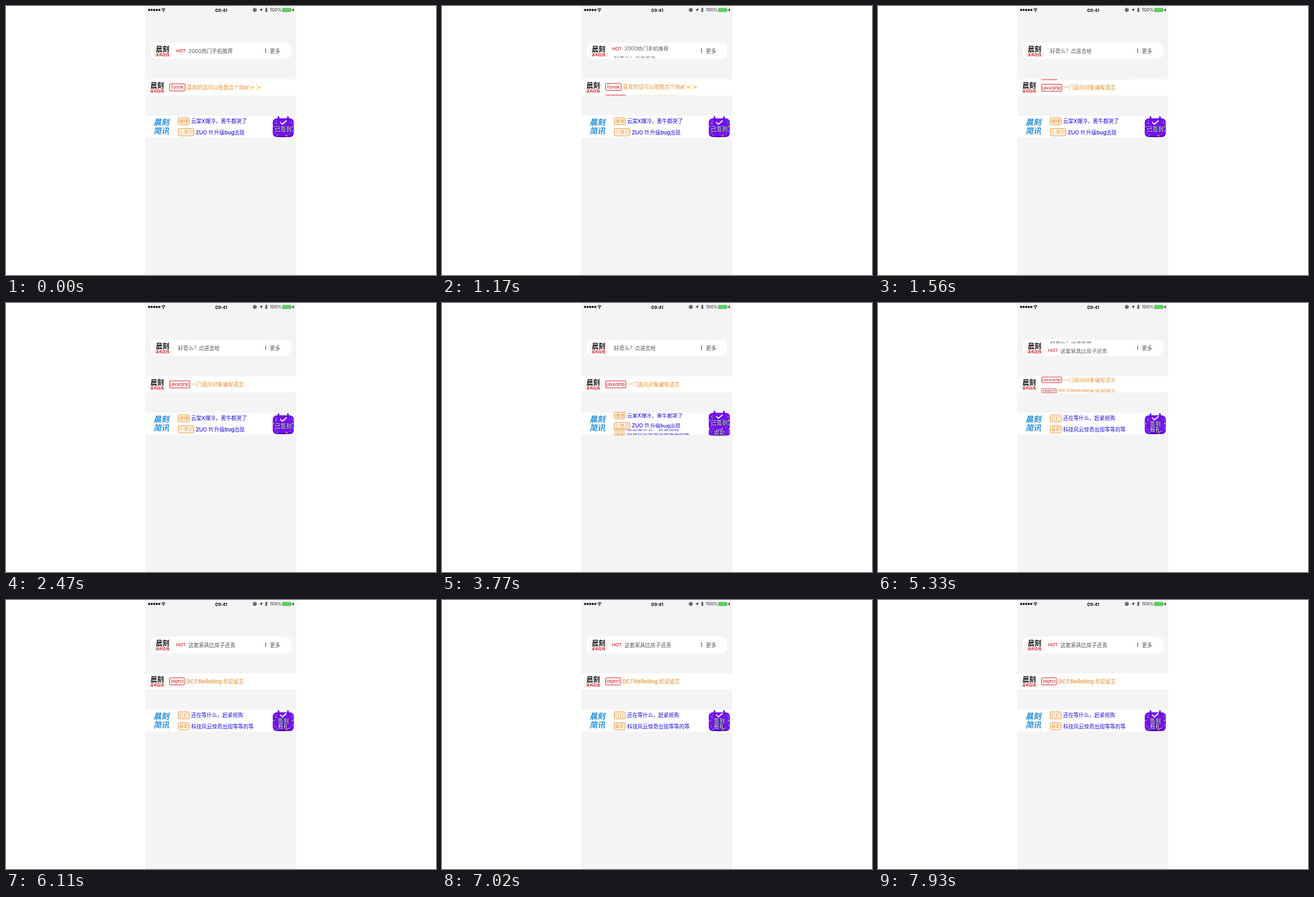
Write an HTML page that moves like this. It is 640x400 px and loops after 8000 ms.

```html
<!DOCTYPE html>
<html lang="zh-CN">
<head>
<meta charset="utf-8">
<style>
  html, body { margin: 0; width: 100%; height: 100%; overflow: hidden; background: #fff; }
  svg { display: block; width: 640px; height: 400px; }
  text { font: 7.75px Inter, "Noto Sans CJK SC", "Noto Sans CJK", sans-serif; white-space: pre; }
</style>
</head>
<body>
<svg id="stage" viewBox="0 0 640 400"></svg>
<script>
const LOOP = 8000, ROLL = 500;
const RED = '#d0262a', ORANGE = '#e58f28', BLUE = '#1c0cd2', GREY = '#555';

const text = (x, y, str, fill, size = 7.75, extra = '') =>
  `<text x="${x}" y="${y + size * 0.37}" fill="${fill}" style="font-size:${size}px;${extra}">${str}</text>`;
const middle = 'text-anchor:middle;';
const medium = 'font-weight:500;';
const bold = 'font-weight:700;';
const rect = (x, y, w, h, fill, r = 0) =>
  `<rect x="${x}" y="${y}" width="${w}" height="${h}" rx="${r}" fill="${fill}"/>`;
const line = (d, stroke, width = 1) =>
  `<path d="${d}" fill="none" stroke="${stroke}" stroke-width="${width}" stroke-linecap="round" stroke-linejoin="round"/>`;

const tag = (x, y, w, str, color, size) =>
  `<rect x="${x + .4}" y="${y - 5.2}" width="${w - .8}" height="10.4" rx="1.4" fill="none" stroke="${color}" stroke-width=".9"/>` +
  text(x + w / 2, y, str, color, size, middle + medium);

const sparkle = (x, y, r) => {
  const k = r * .2;
  return `<path d="M${x} ${y - r}L${x + k} ${y - k}L${x + r} ${y}L${x + k} ${y + k}L${x} ${y + r}L${x - k} ${y + k}L${x - r} ${y}L${x - k} ${y - k}Z" fill="#f3c64a"/>`;
};
const sparkles = x => sparkle(x + 5.6, .3, 3.8) + sparkle(x + 2, -2.6, 1.7) + sparkle(x + 2.2, 3, 1.7);

const badge = (x, y) =>
  `<rect x="${x + .3}" y="${y - 4.5}" width="25.4" height="12" fill="none" stroke="#ecdccb" stroke-width=".6"/>` +
  rect(x + 2.5, y - 7.5, 21, 15, '#fff') +
  text(x + 13, y - 2.4, '晨刻', '#111', 10, middle + 'font-weight:900;') +
  text(x + 13, y + 4.7, '禾屿在线', RED, 5.1, middle + bold);

const calendar = (lines, checkY) => {
  const confetti = [
    [399, -1, '#f0a23c'], [401, -6, '#29c3d8'], [403, -9, '#e336b4'], [425, -7, '#2b9df0'],
    [427, -1, '#e9d34a'], [400, 8, '#e336b4'], [404, 12, '#29c3d8'], [417, 12.5, '#f0a23c'],
    [423, 10, '#e336b4'], [426.5, 6, '#29c3d8']
  ];
  return rect(397, -12.5, 31.5, 28, '#7412f0', 6) +
    line('M400 13Q412 17 425.5 13', '#3d0b9c', 1.3) +
    confetti.map(([x, y, c], i) => line(`M${x} ${y}l${i % 2 ? 1.4 : -1} 1.5`, c, 1.3)).join('') +
    line('M405.6 -14.5v4M419.6 -14.5v4', '#5a12d0', 2.4) +
    line(`M408.4 ${checkY}l3 2.8l5.8 -5.2`, '#fff', 1.6) +
    lines.map(([str, y]) =>
      text(412.7, y, str, '#fff', 8.3, middle + medium + 'paint-order:stroke;stroke:#35107c;stroke-width:1px;')).join('');
};

const hot = str => text(253, 0, 'HOT', RED, 6.8, medium) + text(271.5, 0, str, GREY);
const tagged = (width, label, str, extra = '') =>
  tag(243, 0, width, label, RED, 6.6) + text(243 + width + 2.2, 0, str, ORANGE, 7.75, medium) + extra;
const news = (pairs, icon) => pairs.map(([label, str], i) => {
  const y = i * 16.3 - 8, w = label.length * 7 + 3;
  return tag(256, y, w, label, ORANGE, 7.1) + text(258.5 + w, y, str, BLUE, 7.75, medium);
}).join('') + icon;

// Each row is a cube turning upwards; radius sets how far its faces travel.
const rows = [
  { y: 66.8, radius: 9.5, starts: [1014, 5014], faces: [
    hot('2000热门手机推荐'),
    text(256, 0, '好奇么？点进去哈', GREY),
    hot('这套家具比房子还贵')
  ] },
  { y: 121, radius: 11.5, starts: [1115, 5115], faces: [
    tagged(24, 'fornik', '喜欢的话可以给我点个Star', sparkles(361) + sparkles(371.3)),
    tagged(31, 'java/php', '一门面向对象编程语言'),
    tagged(23.5, 'object', 'DCTitleRolling 欢迎留言')
  ] },
  { y: 179.5, radius: 13, starts: [3614], faces: [
    news([['爆爆', '云棠X爆冷，黄牛都哭了'], ['小常识', 'ZUO 11 升级bug出现']],
      calendar([['已签到', 3.5]], -6.5)),
    news([['红红', '还在等什么，赶紧抢购'], ['最新', '科技风云惊奇出现等等的等']],
      calendar([['签到', .7], ['有礼', 8.3]], -8.5))
  ] }
];

const statusBar =
  [0, 1, 2, 3, 4].map(i => `<circle cx="${213 + i * 3.8}" cy="5.8" r="1.6" fill="#000"/>`).join('') +
  line('M231.7 4.5Q234.3 2.3 236.9 4.5M232.8 6Q234.3 4.8 235.8 6', '#000', 1) +
  '<circle cx="234.3" cy="7.6" r=".9"/>' +
  text(320.3, 6, '09:41', '#000', 6.8, middle + 'font-weight:600;') +
  '<circle cx="370.3" cy="5.8" r="2.5" fill="none" stroke="#000" stroke-width=".8"/>' +
  rect(369.2, 5.4, 2.2, 1.7, '#000') +
  line('M369.7 5.4v-.6q.6 -.8 1.2 0v.6', '#000', .5) +
  '<path d="M382 3.4L377 5.9H379.5V8.4Z"/>' +
  line('M385.7 4.2l3.3 3.2l-1.7 1.5v-6.2l1.7 1.5l-3.3 3.2', '#000', .7) +
  text(393, 6, '100%', '#222', 6.4) +
  '<rect x="411.2" y="3.2" width="13" height="5.4" rx="1" fill="#58d35c" stroke="#4a9a4c" stroke-width=".5"/>' +
  rect(424.6, 4.8, .9, 2.2, '#4a9a4c') +
  '<path d="M428.2 3L426 6.3H427.3L426.8 8.8L429 5.4H427.7Z"/>';

const slanted = (y, str) =>
  `<g transform="translate(232 ${y}) skewX(-10)">` +
  text(0, 0, str, '#258cd6', 11.6, middle + bold) + '</g>';

const stage = document.getElementById('stage');
stage.innerHTML =
  rect(207, 0, 225, 400, '#f4f4f4') + statusBar +
  rect(215.5, 54.5, 208.5, 24, '#fff', 8) +
  rect(207, 109, 225, 24, '#fff') +
  rect(207, 163, 225, 32.7, '#fff') +
  badge(220, 67) + badge(212, 121) +
  slanted(173, '晨刻') + slanted(186, '简讯') +
  rect(386, 63, .9, 7, '#5b4a3c') + text(392.7, 66.8, '更多', GREY) +
  rows.map(row => row.faces.map(face => `<g class="face">${face}</g>`).join('')).join('');

const nodes = [...stage.querySelectorAll('.face')];
for (const row of rows) row.nodes = nodes.splice(0, row.faces.length);

const ease = t => {
  t = Math.min(1, Math.max(0, t));
  return t * t * (3 - 2 * t);
};

function draw(now) {
  const time = now % LOOP;
  for (const { y, radius, starts, nodes } of rows) {
    const turn = starts.reduce((sum, start) => sum + ease((time - start) / ROLL), 0);
    nodes.forEach((node, i) => {
      const q = i - turn, angle = q * Math.PI / 2;
      const visible = Math.abs(q) < .999;
      node.style.display = visible ? '' : 'none';
      if (visible) node.setAttribute('transform',
        `translate(0 ${y + radius * Math.sin(angle)}) scale(1 ${Math.cos(angle)})`);
    });
  }
}

const begin = performance.now();
function tick() {
  draw(performance.now() - begin);
  requestAnimationFrame(tick);
}
tick();
</script>
</body>
</html>
```
